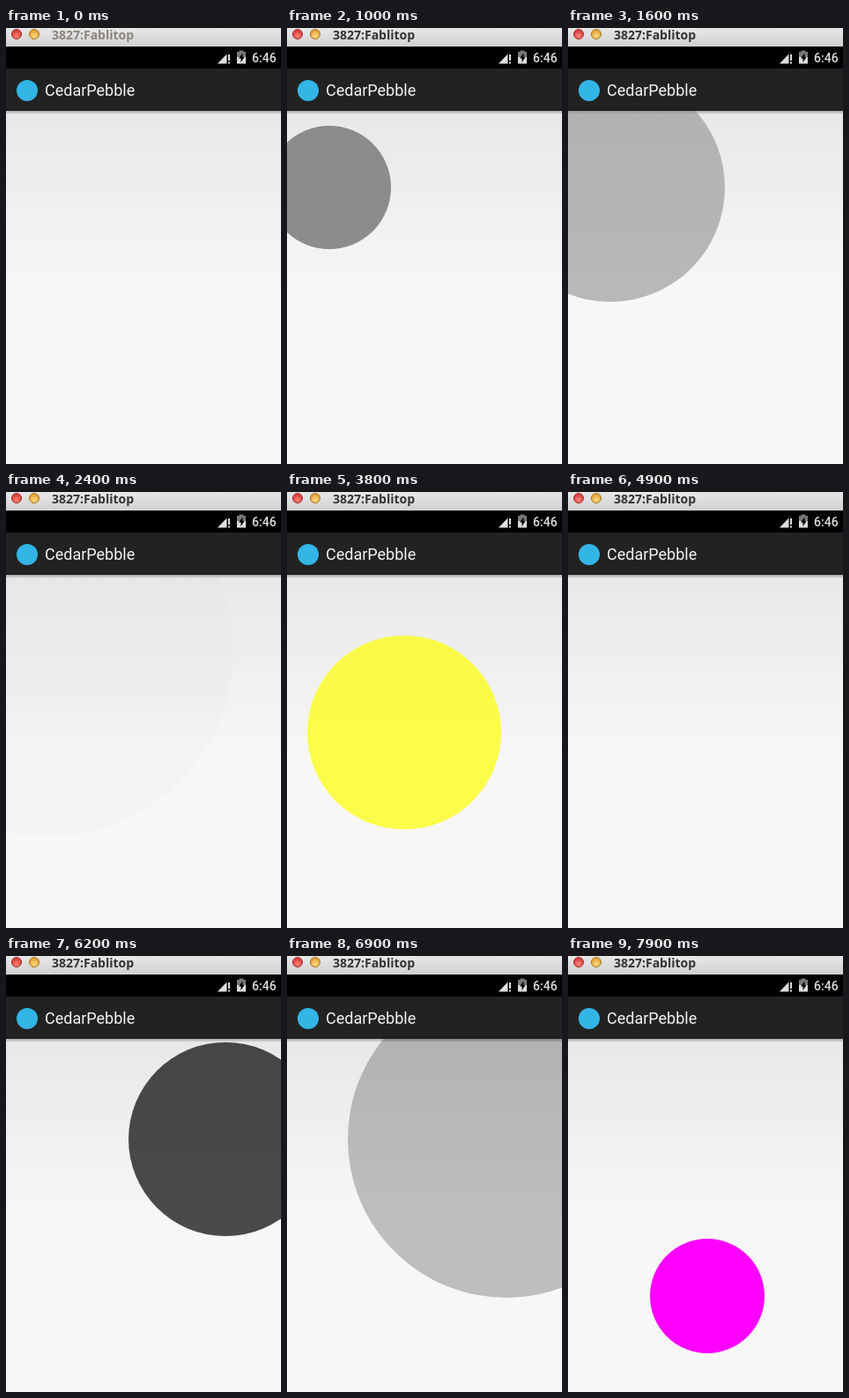
Write an HTML page that moves like this. It is 312 px wide and 495 px high and loops after 8000 ms.

```html
<!DOCTYPE html>
<html lang="en">
<head>
<meta charset="utf-8">
<title>Bubbles</title>
<style>
  html, body { margin: 0; width: 100%; height: 100%; overflow: hidden; background: #f7f7f7; }
  svg { display: block; width: 100%; height: 100%; }
  .window { font: 700 14px "Open Sans", "Noto Sans", sans-serif; }
  .clock { font: 500 14px Roboto, sans-serif; fill: #dedede; }
  .app { font: 400 18px Roboto, sans-serif; fill: #f3f3f3; }
</style>
</head>
<body>
<svg viewBox="0 0 312 495">
  <defs>
    <linearGradient id="page" x2="0" y2="1">
      <stop offset="0" stop-color="#e8e8e8"/>
      <stop offset=".52" stop-color="#f7f7f7"/>
    </linearGradient>
    <linearGradient id="frame" x2="0" y2="1">
      <stop offset="0" stop-color="#e8e8e8"/>
      <stop offset="1" stop-color="#d0d0d0"/>
    </linearGradient>
    <linearGradient id="shade" x2="0" y2="1">
      <stop offset="0" stop-opacity=".3"/>
      <stop offset="1" stop-opacity="0"/>
    </linearGradient>
    <radialGradient id="red" cy=".7">
      <stop offset="0" stop-color="#ff8a80"/>
      <stop offset="1" stop-color="#d9433e"/>
    </radialGradient>
    <radialGradient id="amber" cy=".7">
      <stop offset="0" stop-color="#ffe08a"/>
      <stop offset="1" stop-color="#e9a63a"/>
    </radialGradient>
  </defs>

  <rect y="94" width="312" height="401" fill="url(#page)"/>
  <rect y="94" width="312" height="4" fill="url(#shade)"/>
  <circle id="bubble"/>

  <!-- window frame -->
  <rect width="312" height="21" fill="url(#frame)"/>
  <circle cx="12" cy="7" r="5.5" fill="url(#red)" stroke="#a5302c"/>
  <circle cx="32" cy="7" r="5.5" fill="url(#amber)" stroke="#a9742a"/>
  <text id="title" class="window" x="52" y="13">3827:Fablitop</text>

  <!-- status bar -->
  <rect y="21" width="312" height="25" fill="#000"/>
  <path d="M240 40.500L250.500 29.500V40.500Z" fill="#dedede"/>
  <path d="M250.500 29.500L253 27V28.500H250.500Z" fill="#555"/>
  <path d="M252 30h2v7h-2zM252 38.500h2v2h-2z" fill="#dedede"/>
  <path d="M262 27h2.500v-1.500h5V27H272v6H262z" fill="#777"/>
  <path d="M262 33h10v7.500H262z" fill="#dedede"/>
  <path d="M268.500 28.500L264 34.500h2.500V39l4-6h-2z" fill="#000"/>
  <text class="clock" x="279" y="39">6:46</text>

  <!-- action bar -->
  <rect y="46" width="312" height="48" fill="#222"/>
  <rect y="46" width="312" height="1" fill="#17222d"/>
  <rect y="93" width="312" height="1" fill="#181818"/>
  <circle cx="24" cy="71" r="12" fill="#33b5e5"/>
  <text class="app" x="44" y="77">CedarPebble</text>
</svg>
<script>
  const LOOP = 8000, STEP = 100, GROWTH = 10, FADE = 0.0067, FULL = 65;
  const bubbles = [
    { start: 1000, x: 48,  y: 181, from: 70, to: 210, color: "#888" },
    { start: 3400, x: 133, y: 273, from: 70, to: 220, color: "#ff0" },
    { start: 5800, x: 249, y: 208, from: 70, to: 220, color: "#000" },
    { start: 7900, x: 158, y: 386, from: 65, to: 220, color: "#f0f" }
  ];
  const bubble = document.getElementById("bubble");
  const title = document.getElementById("title");

  function set(node, attributes) {
    for (const name in attributes) node.setAttribute(name, attributes[name]);
  }

  function draw() {
    const time = performance.now() % LOOP;
    const active = bubbles.filter(b => b.start <= time).pop();
    // The window has no focus until the first bubble appears.
    set(title, { fill: active ? "#333" : "#8b8580" });
    if (active) {
      const steps = Math.floor((time - active.start) / STEP);
      const r = Math.min(active.to, active.from + steps * GROWTH);
      const opacity = Math.max(0, 1 - (r - FULL) * FADE);
      set(bubble, { cx: active.x, cy: active.y, r, fill: active.color, opacity });
    } else {
      set(bubble, { opacity: 0 });
    }
    requestAnimationFrame(draw);
  }
  draw();
</script>
</body>
</html>
```
